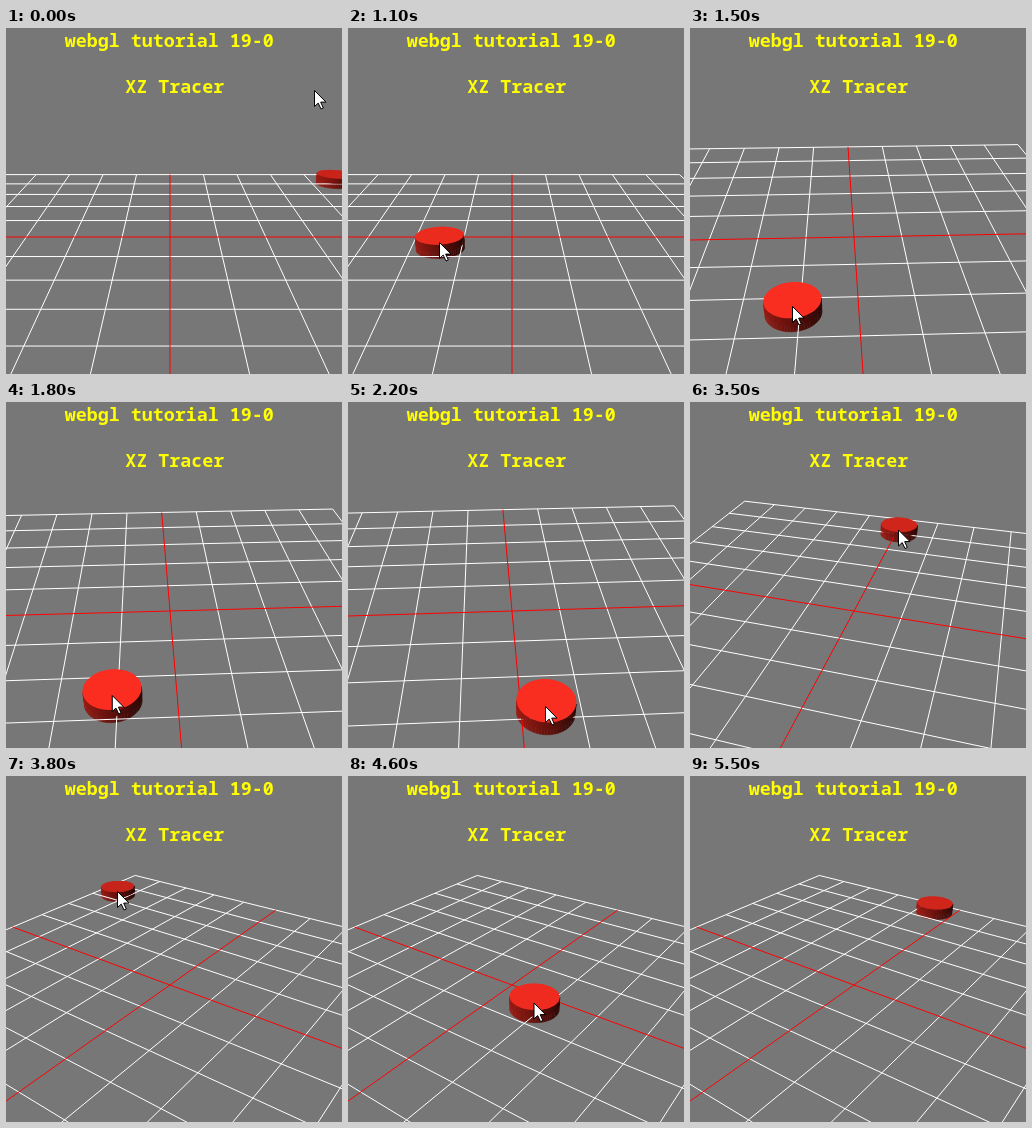
Animation, 336 px wide and 346 px high, one loop 5800 ms. Source, as an HTML page with a canvas:

```html
<!DOCTYPE html>
<html>
<head>
<meta charset="utf-8">
<title>XZ Tracer</title>
<style>
  html, body { margin: 0; width: 100%; height: 100%; overflow: hidden; background: #777; }
  canvas, svg { position: absolute; left: 0; top: 0; }
  text { font: bold 18.33px "Noto Sans Mono", monospace; fill: #ff0; white-space: pre; }
</style>
</head>
<body>
<canvas id="stage" width="336" height="346"></canvas>
<svg width="336" height="346">
  <text x="58.7" y="19">webgl tutorial 19-0</text>
  <text x="119.2" y="65">XZ Tracer</text>
</svg>
<script>
const ctx = document.getElementById('stage').getContext('2d');
const LOOP = 5800, STEP = 100;
const CX = 164, CY = 209, FOCAL = 515.4, DIST = 10.763;
const RADIUS = 0.49, HALF = 0.145, SIDES = 64, GRID = 5;
const PITCH = 21.9, DRAG = 0.2;         // degrees, and degrees per dragged pixel
const RAD = Math.PI / 180;

// Pointer stops: x, y, time to get there, rest
const stops = [
  [309, 62, 0, 0],
  [176, 188, 500, 100],
  [92, 214, 500, 0],
  [93, 229, 100, 0],
  [103, 278, 300, 0],
  [108, 298, 400, 0],
  [198, 304, 300, 0],
  [220, 300, 200, 0],
  [306, 140, 600, 200],
  [112, 115, 600, 0],
  [205, 249, 600, 0],
  [168, 204, 400, 300],
  [316, 64, 300, 0]
];
const drags = [[1200, 1900], [3200, 3800]];    // the pointer also orbits the camera
const ENTER = 300, LEAVE = 5255, GONE = 5500;  // the disc follows only over the grid
const IDLE = [328, 151];

let sinP, cosP, sinA, cosA;

const clamp = (v, lo, hi) => Math.min(hi, Math.max(lo, v));

function pointer(t) {
  let x, y;
  for (const [nx, ny, move, rest] of stops) {
    if (t < move) return [x + (nx - x) * t / move, y + (ny - y) * t / move];
    [x, y] = [nx, ny];
    t = Math.max(0, t - move - rest);
  }
  return [x, y];
}

function setCamera(t) {
  let yaw = 0, pitch = PITCH;
  for (const [from, to] of drags) {
    const [x0, y0] = pointer(from), [x1, y1] = pointer(clamp(t, from, to));
    yaw += (x1 - x0) * DRAG;
    pitch += (y1 - y0) * DRAG;
  }
  sinP = Math.sin(pitch * RAD); cosP = Math.cos(pitch * RAD);
  sinA = Math.sin(yaw * RAD); cosA = Math.cos(yaw * RAD);
}

// Coordinates here are already turned by the yaw
function project(x, y, z) {
  const k = FOCAL / (DIST - z * cosP - y * sinP);
  return [CX + x * k, CY + (z * sinP - y * cosP) * k];
}

// Point of the ground plane under a screen position
function ground(sx, sy) {
  const v = sy - CY;
  const z = v * DIST / (FOCAL * sinP + v * cosP);
  const depth = DIST - z * cosP;
  return { x: (sx - CX) * depth / FOCAL, z, depth };
}

function trace(points) {
  ctx.beginPath();
  for (const p of points) ctx.lineTo(...p);
}

// One grid line along each direction
function cross(i, color) {
  const at = (x, z) => project(x * cosA + z * sinA, 0, z * cosA - x * sinA);
  ctx.strokeStyle = color;
  for (const ends of [[at(i, -GRID), at(i, GRID)], [at(-GRID, i), at(GRID, i)]]) {
    trace(ends);
    ctx.stroke();
  }
}

function grid() {
  ctx.lineWidth = 1;
  for (let i = -GRID; i <= GRID; i++) if (i) cross(i, '#fff');
  cross(0, '#f00');
}

const red = r => `rgb(${r},${r * 0.18},${r * 0.13})`;

function disc({ x, z, depth }, bottom) {
  const rim = (i, y) => {
    const a = i / SIDES * 2 * Math.PI;
    return project(x + RADIUS * Math.sin(a), y, z + RADIUS * Math.cos(a));
  };
  ctx.lineWidth = 0.5;
  for (let i = 0; i < SIDES; i++) {
    const a = (i + 0.5) / SIDES * 2 * Math.PI;
    const nx = Math.sin(a), nz = Math.cos(a);
    if (nz * (DIST * cosP - z) - nx * x < RADIUS) continue;
    trace([rim(i, bottom), rim(i + 1, bottom), rim(i + 1, HALF), rim(i, HALF)]);
    ctx.fillStyle = ctx.strokeStyle = red(100 - 55 * nx);
    ctx.fill();
    ctx.stroke();
  }
  trace(Array.from({ length: SIDES }, (_, i) => rim(i, HALF)));
  ctx.fillStyle = red(clamp(316 - 7.6 * depth, 0, 250));
  ctx.fill();
}

const arrowShape = new Path2D('M0 0V16L3.7 12.6 6.5 18.5 8.8 17.5 6.2 11.6H11.5Z');

function arrow([x, y]) {
  ctx.save();
  ctx.translate(x - 0.5, y + 0.5);
  ctx.fillStyle = '#fff';
  ctx.strokeStyle = '#000';
  ctx.lineWidth = 1;
  ctx.fill(arrowShape);
  ctx.stroke(arrowShape);
  ctx.restore();
}

function draw(t) {
  setCamera(t);
  ctx.fillStyle = '#777';
  ctx.fillRect(0, 0, 336, 346);
  const spot = ground(...(t < ENTER ? IDLE : pointer(Math.min(t, LEAVE))));
  disc(spot, -HALF);
  grid();
  disc(spot, 0);      // the half above the ground hides the grid
  if (t < GONE) arrow(pointer(t));
}

const start = performance.now();
function tick() {
  const t = (performance.now() - start) % LOOP;
  draw(Math.floor(t / STEP) * STEP);
  requestAnimationFrame(tick);
}
tick();
</script>
</body>
</html>
```
